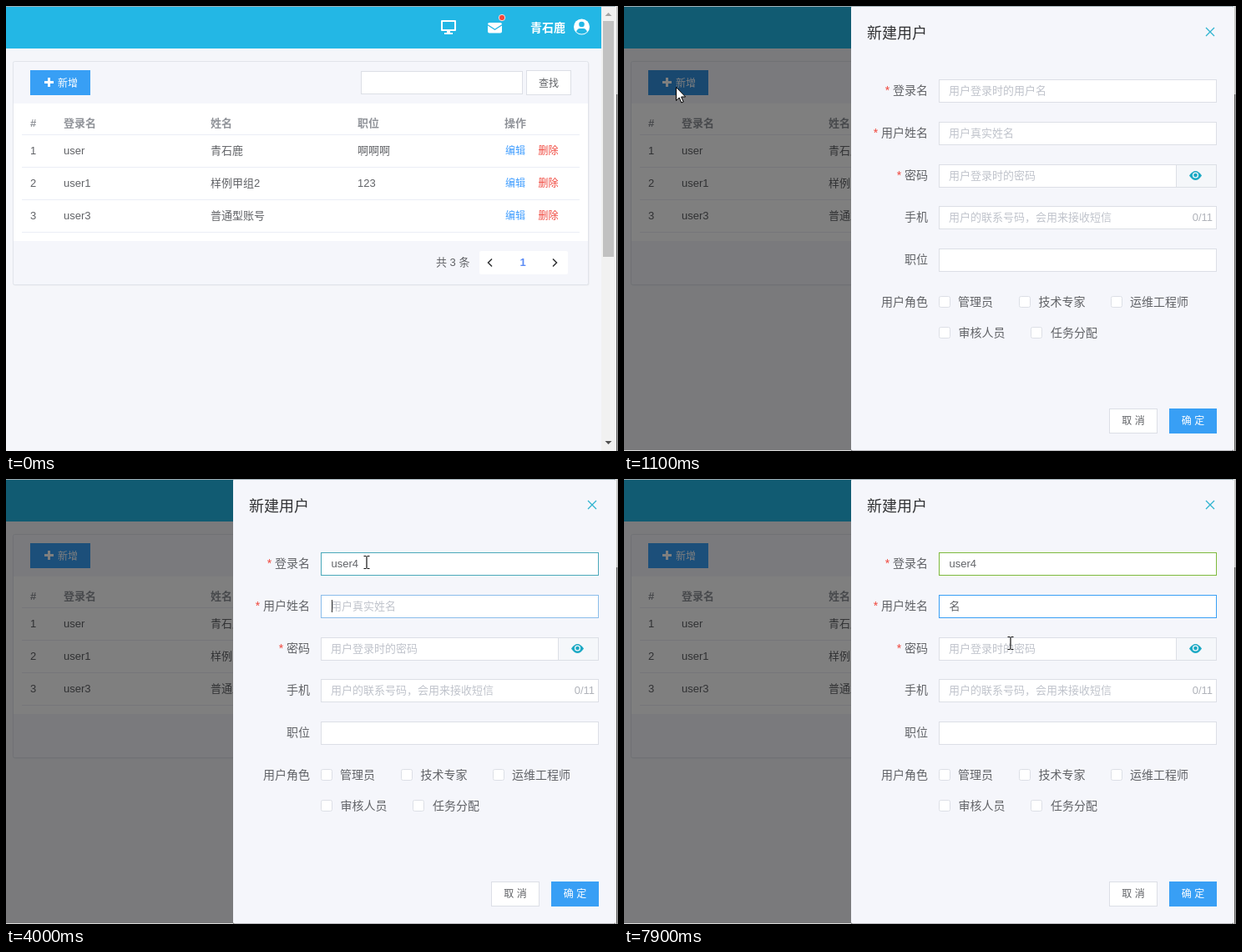
Write an HTML page that moves like this. It is 733 by 534 pixels and loops after 8 s.

```html
<!DOCTYPE html>
<html lang="zh-CN">
<head>
<meta charset="utf-8">
<title>新建用户</title>
<style>
html, body { margin: 0; width: 100%; height: 100%; overflow: hidden; background: #f5f6fa; }
svg { display: block; width: 733px; height: 534px; font: 13px "Liberation Sans", "Noto Sans CJK SC", "Noto Sans CJK", sans-serif; fill: #606266; }
text { white-space: pre; }
.b { font-weight: bold; }
.s { font-size: 12px; }
.m { font-size: 14px; }
.grey { fill: #909399; }
.hint { fill: #c0c4cc; }
.white { fill: #fff; }
.blue { fill: #409eff; }
.red { fill: #f0483e; }
.box { fill: #fff; stroke: #dcdfe6; }
.line { fill: none; stroke: #303133; stroke-width: 1.5; }
</style>
</head>
<body>
<svg id="stage" viewBox="0 0 733 534"></svg>
<script>
const text = (x, y, str, cls = '', more = '') => `<text x="${x}" y="${y}" class="${cls}" ${more}>${str}</text>`;
const rect = (x, y, w, h, fill, more = '') => `<rect x="${x}" y="${y}" width="${w}" height="${h}" fill="${fill}" ${more}/>`;
const box = (x, y, w, h, more = '') => `<rect class="box" x="${x + .5}" y="${y + .5}" width="${w - 1}" height="${h - 1}" ${more}/>`;
const mid = 'text-anchor="middle"', end = 'text-anchor="end"';

const header = `
  ${rect(0, 0, 731, 51, '#23b7e5')}
  <g id="tools">
    <path class="white" fill-rule="evenodd" d="M522 17h16q1 0 1 1v11q0 1-1 1h-6v2h3v2h-10v-2h3v-2h-6q-1 0-1-1v-11q0-1 1-1zM523 19v9h14v-9z"/>
    <path class="white" d="M579 20h13q2 0 2 2l-8.500 5.500-8.500-5.500q0-2 2-2zM577 23.500l8.500 5.500 8.500-5.500v7q0 2-2 2h-13q-2 0-2-2z"/>
    <circle cx="594" cy="14" r="3.700" fill="#f5473c" stroke="#fff" stroke-width=".8"/>
    ${text(628, 31, '青石鹿', 'm b white')}
    <circle class="white" cx="689.500" cy="25" r="9.500"/>
    <circle cx="689.500" cy="22" r="3.300" fill="#23b7e5"/>
    <path fill="#23b7e5" d="M683 31q1.500-4 4-4h5q2.500 0 4 4-6.500 5-13 0z"/>
  </g>`;

const rows = [['1', 'user', '青石鹿', '啊啊啊'], ['2', 'user1', '样例甲组2', '123'], ['3', 'user3', '普通型账号', '']];
const cols = [29, 69, 245, 421];

const card = `
  ${rect(8.5, 67.5, 690, 268, '#000', 'opacity=".06" rx="2"')}
  ${rect(8.5, 66.5, 689, 268, '#f5f6fb', 'stroke="#e1e4ea" rx="2"')}
  ${rect(9, 117, 688, 165, '#fff')}
  ${rect(29, 77, 72, 30, '#389ff5', 'id="add"')}
  <path class="white" d="M50 86h3v4h4v3h-4v4h-3v-4h-4v-3h4z"/>
  ${text(62, 96.5, '新增', 's white')}
  ${box(425, 78, 194, 28)}${box(623, 77, 54, 30)}
  ${text(650, 96.5, '查找', 's', mid)}
  ${['#', '登录名', '姓名', '职位'].map((s, i) => text(cols[i], 145, s, 'b grey')).join('')}
  ${text(597, 145, '操作', 'b grey')}
  ${[0, 1, 2, 3].map(i => rect(19, 154 + 39 * i, 668, 1, '#ebeef5')).join('')}
  ${rows.map((r, i) => r.map((s, j) => text(cols[j], 178 + 39 * i, s)).join('')
    + text(598, 178 + 39 * i, '编辑', 's blue') + text(637.5, 178 + 39 * i, '删除', 's red')).join('')}
  ${text(515, 312, '共 3 条')}
  ${rect(567, 294, 106, 28, '#fff', 'rx="2"')}
  <path class="line" d="M582 303.500l-4.500 4.500 4.500 4.500M655 303.500l4.500 4.500-4.500 4.500"/>
  ${text(619, 312, '1', 'b', mid + ' style="fill:#5a8bf5"')}`;

const scrollbar = `<g id="scroll">
  ${rect(713, 0, 17, 534, '#f1f1f1')}${rect(715, 18, 13, 283, '#c1c1c1', 'id="thumb"')}
  <path fill="#a3a3a3" d="M717.500 12l4-4 4 4z"/><path fill="#505050" d="M717.500 522l4 4 4-4z"/></g>`;

const label = (y, str, must) => text(364, y + 5, (must ? '<tspan class="red">* </tspan>' : '') + str, 'm', end);
const fields = [
  [88, '登录名', '用户登录时的用户名', 1], [139, '用户姓名', '用户真实姓名', 1], [190, '密码', '用户登录时的密码', 1],
  [240, '手机', '用户的联系号码，会用来接收短信', 0], [291, '职位', '', 0]];
const roles = [[377, 348, '管理员', 400], [473, 348, '技术专家', 496.5], [583, 348, '运维工程师', 606],
  [377, 385, '审核人员', 400.5], [487, 385, '任务分配', 511]];

const dialog = `<g id="dialog">
  ${rect(272, 0, 458, 533.5, '#f5f6fb', 'rx="2"')}
  ${text(291, 38.5, '新建用户', '', 'font-size="18" style="fill:#303133"')}
  <path d="M697 26l10 10M707 26l-10 10" fill="none" stroke="#2fb4cf" stroke-width="1.300"/>
  ${fields.map(([y, name, hint, must], i) => label(y + 13, name, must) + box(377, y, 333, 28, `id="box${i}"`)
    + text(389, y + 18, hint, 'hint', `id="hint${i}"`)).join('')}
  ${[0, 1].map(i => text(389.5, 106 + 51 * i, '', '', `id="value${i}"`)).join('')}
  ${rect(390, 94, 1, 15, '#333', 'id="caret"')}
  ${rect(661.5, 190.5, 48, 27, '#f5f7fa', 'stroke="#dcdfe6"')}
  <path fill="#1ba9c4" d="M677 203.500q7.500-11 15 0-7.500 11-15 0z"/>
  <circle cx="684.500" cy="203" r="3.600" fill="#f5f7fa"/><circle cx="684.500" cy="203" r="2.300" fill="#1ba9c4"/>
  ${text(705, 258, '0/11', 'grey', end + ' style="fill:#b0b3ba"')}
  ${label(355, '用户角色')}
  ${roles.map(([x, y, s, tx]) => box(x, y, 14, 14, 'rx="2"') + text(tx, y + 12, s, 'm')).join('')}
  <g id="ticks">${[377, 487].map(x => rect(x + .5, 385.5, 13, 13, '#cfe3f3', 'rx="2" stroke="#8fbde0"')
    + `<path d="M${x + 4} 392l2.500 2.500 4-5" fill="none" stroke="#fff" stroke-width="1.300"/>`).join('')}</g>
  ${box(581, 483, 58, 30)}${rect(653, 483, 57, 30, '#389ff5')}
  ${text(610, 502, '取 消', 's', mid)}${text(681.5, 502, '确 定', 's white', mid)}
</g>`;

const ime = `<g id="ime">${rect(400.5, 168.5, 304, 47, '#fff', 'id="imeBox" stroke="#d5d8de"')}
  ${text(409, 185, '', '', 'id="pinyin"')}${text(409, 207, '', '', 'id="words"')}</g>`;

const frame = `
  ${rect(0, 0, 731, 1, '#a3b1b8')}${rect(0, 533, 272, 1, '#dcdcdc', 'id="foot"')}
  ${rect(730, 0, 3, 534, '#f4f4f4')}${rect(731, 0, 2, 106, '#c4c4c4')}${rect(731, 106, 1.5, 428, '#555')}`;

const pointers = `
  <path id="arrow" d="M.500.500v16l3.700-3.500 2.600 6 2.400-1-2.600-6h5z" fill="#fff" stroke="#000"/>
  <path id="beam" d="M-3.500-7.500h3M.500-7.500h3M0-7v14M-3.500 7.500h3M.500 7.500h3" fill="none" stroke="#111" stroke-width="1.200"/>`;

document.getElementById('stage').innerHTML = header
  + rect(713, 51, 17, 483, '#f8f8f9') + card + scrollbar
  + rect(0, 0, 730, 534, '#000', 'id="shade"') + dialog + ime + frame + pointers;

const $ = id => document.getElementById(id);
const show = (id, on) => { $(id).style.display = on ? '' : 'none'; };
// Last entry of [time, value] pairs that has begun
const at = (t, list) => list.reduce((v, [start, next]) => t >= start ? next : v, list[0][1]);

const login = [[0, ''], [2000, 'u'], [2100, 'us'], [2200, 'use'], [2300, 'user'], [3600, 'user4']];
const person = [[0, ''], [5400, 'm'], [5800, 'mi'], [6000, ''], [6200, 'mi'], [6300, 'min'], [6700, 'ming'], [7200, '名']];
const caretOn = [[0, false], [1800, true], [2700, false], [3200, true], [4400, false], [4900, true], [6000, false], [6200, true], [7200, false]];
const border = [
  [[0, '#dcdfe6'], [1800, '#48a4dc'], [1900, '#389ff5'], [4000, '#4aa9ba'], [4100, '#7dba3c']],
  [[0, '#dcdfe6'], [4000, '#8abdea'], [4100, '#389ff5']]];
const beamPath = [[0, [432, 100]], [7600, [410, 112]], [7700, [436, 150]], [7800, [457, 186]], [7900, [463, 197]]];

function draw(now) {
  const t = Math.floor(now % 8000 / 100) * 100;
  const narrow = t < 800;
  show('scroll', narrow);
  $('tools').setAttribute('transform', `translate(${narrow ? 0 : 17})`);
  $('thumb').setAttribute('fill', t >= 100 && t < 200 ? '#a8a8a8' : '#c1c1c1');
  $('add').setAttribute('fill', t >= 600 && t < 1700 ? '#3391e0' : '#389ff5');

  const open = at(t, [[0, 0], [1000, .75], [1100, 1]]);
  $('shade').setAttribute('opacity', at(t, [[0, 0], [1000, .46], [1100, .5]]));
  $('dialog').setAttribute('opacity', open);
  $('dialog').setAttribute('transform', `translate(0 ${-20 * (1 - open)})`);
  show('foot', open > 0);
  show('ticks', t < 1100);

  [login, person].forEach((list, i) => {
    const value = at(t, list);
    $('value' + i).textContent = value;
    show('hint' + i, !value);
    $('box' + i).style.stroke = at(t, border[i]);
  });
  const active = t < 4000 ? 0 : 1, field = $('value' + active);
  show('caret', at(t, caretOn));
  $('caret').setAttribute('x', 390 + Math.round(field.textContent ? field.getComputedTextLength() : 0));
  $('caret').setAttribute('y', 94 + 51 * active);

  show('ime', t >= 6200 && t < 7200);
  $('imeBox').setAttribute('width', t < 6700 ? 304 : 327);
  $('pinyin').textContent = at(t, person);
  $('words').textContent = at(t, [[0, '1.米  2.密  3.迷  4.蜜  5.秘'], [6300, '1.民  2.敏  3.闽  4.皿  5.悯'], [6700, '1.名  2.明  3.命  4.鸣  5.铭']]);

  const k = Math.min(1, Math.max(0, (t - 100) / 500)), ease = 1 - (1 - k) ** 2;
  show('arrow', t >= 100 && t < 1700);
  $('arrow').setAttribute('transform', `translate(${Math.round(720 - 658 * ease)} ${Math.round(130 - 33 * ease)})`);
  show('beam', t >= 1700);
  $('beam').setAttribute('transform', `translate(${at(t, beamPath)})`);
}

function tick() {
  draw(performance.now());
  requestAnimationFrame(tick);
}
tick();
</script>
</body>
</html>
```
